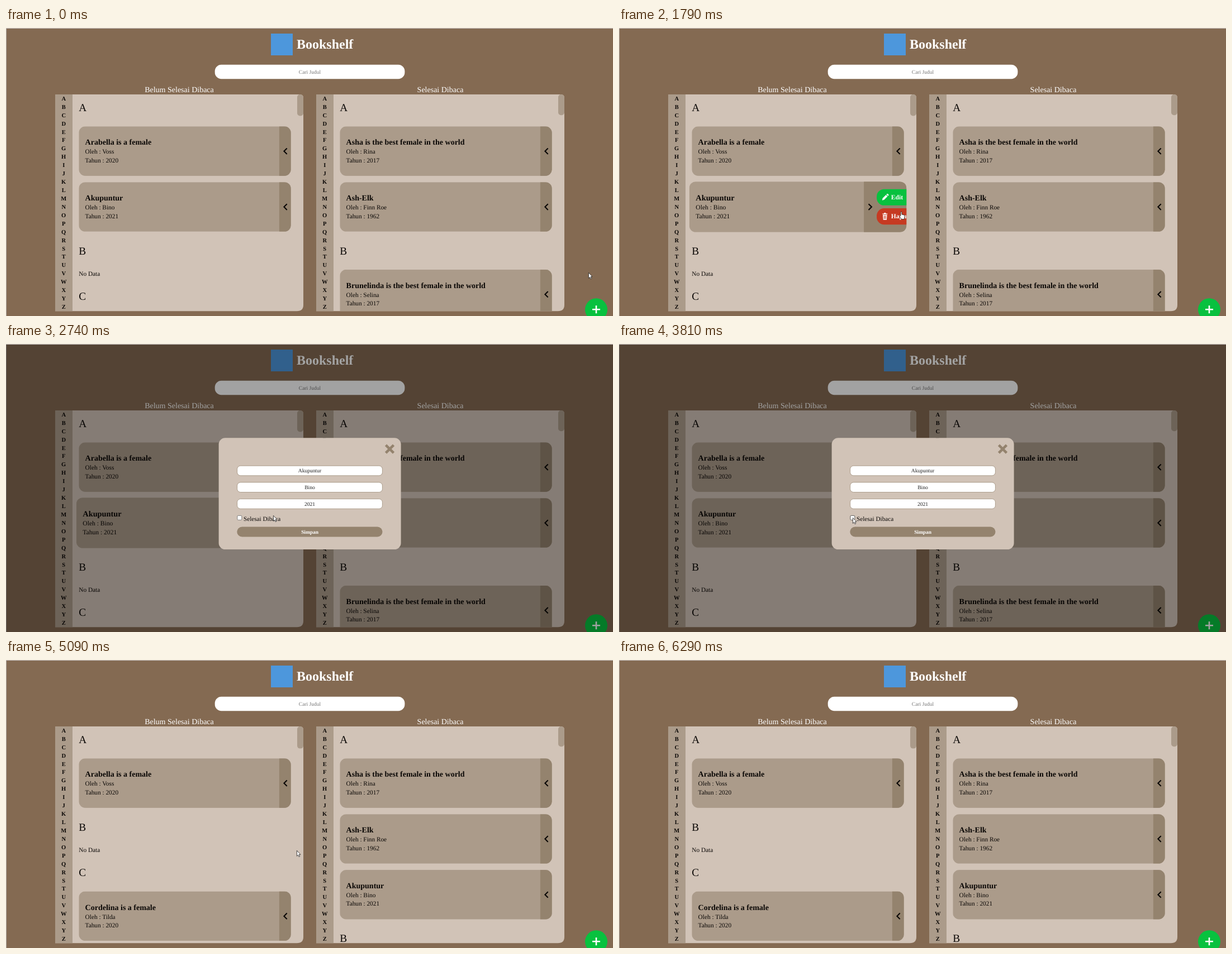
Recreate the animation shown at these times as an HTML page. Size 1086 by 516 pixels, loop 6.84 s.

```html
<!DOCTYPE html>
<html lang="id">
<head>
<meta charset="utf-8">
<title>Bookshelf</title>
<style>
html, body { margin: 0; width: 100%; height: 100%; overflow: hidden; background: #846a52; }
svg { display: block; width: 1086px; height: 516px; font-family: "Liberation Serif", "Times New Roman", serif; text-rendering: geometricPrecision; }
.hide { display: none; }
</style>
</head>
<body>
<svg id="stage" viewBox="0 0 1086 516" xmlns="http://www.w3.org/2000/svg"></svg>
<script>
const LOOP = 6840;
const PANEL = '#d1c3b7', CARD = '#ab9b8a', DARK = '#94836e', GREEN = '#08c13f', INK = '#0b0806';
const CARD_W = 379.4, CARD_H = 88.6, SLOT = 99.9, CLOSED = 20.8, OPEN = 91.8;

const text = (x, y, size, str, opts = '') =>
  `<text x="${x}" y="${y}" font-size="${size}" ${opts}>${str}</text>`;
const rect = (x, y, w, h, r, fill, opts = '') =>
  `<rect x="${x}" y="${y}" width="${w}" height="${h}" rx="${r}" fill="${fill}" ${opts}/>`;
const MID = 'text-anchor="middle"', BOLD = 'font-weight="700"', WHITE = 'fill="#fff"';

const books = {
  arabella: ['Arabella is a female', 'Voss', 2020],
  akupuntur: ['Akupuntur', 'Bino', 2021],
  cordelina: ['Cordelina is a female', 'Tilda', 2020],
  asha: ['Asha is the best female in the world', 'Rina', 2017],
  ashElk: ['Ash-Elk', 'Finn Roe', 1962],
  brunelinda: ['Brunelinda is the best female in the world', 'Selina', 2017]
};

const pencil = `<g transform="translate(9.5 7.6)" fill="#fff">
  <path d="M0 12L.8 8.4 6.7 2.5 9.4 5.2 3.5 11.1Z"/><path d="M7.4 1.8L8.6.6H9.8L11.3 2.1V3.3L10.1 4.5Z"/></g>`;
const trash = `<g transform="translate(10 7.8)">
  <path d="M0 1.3H2.6L3.2 0H5.6L6.2 1.3H8.8V2.7H0ZM.7 3.5H8.1L7.4 12.4H1.4Z" fill="#fff"/>
  <path d="M2.9 5V10.8M4.4 5V10.8M5.9 5V10.8" stroke="#c63a22" stroke-width=".8"/></g>`;

const button = (id, y, icon, label) =>
  `<g transform="translate(22.4 ${y})"><rect id="${id}" width="63.6" height="28.5" rx="13"/>${icon}` +
  text(25.2, 17.5, 11.3, label, `${BOLD} ${WHITE}`) + '</g>';

function card(key, y, id = '') {
  const [title, author, year] = books[key];
  const name = part => id ? `id="${id}${part}"` : '';
  const actions = id === 'edit'
    ? button('editBtn', 13.2, pencil, 'Edit') + button('delBtn', 46.8, trash, 'Hapus') : '';
  return `<g transform="translate(130.3 ${y})"><g ${name('Card')}><g clip-path="url(#cardClip)">` +
    rect(0, 0, CARD_W, CARD_H, 0, CARD) +
    text(11.3, 33.2, 14, title, BOLD) +
    text(11.3, 49, 11.3, 'Oleh : ' + author) +
    text(11.3, 64.4, 11.3, 'Tahun : ' + year) +
    `<g ${name('Toggle')} transform="translate(${CARD_W - CLOSED} 0)">` +
    rect(0, 0, 110, CARD_H, 0, DARK) +
    `<path ${name('Chevron')} transform="translate(11 44.4)" d="M2.8-5.3L-2.5 0 2.8 5.3" fill="none" stroke="${INK}" stroke-width="2.1"/>` +
    actions + '</g></g></g></g>';
}

// Each section: letter followed by its cards, or a "No Data" line.
function panel(dx, thumb, sections) {
  let out = '', base = 149;
  for (const [letter, ...items] of sections) {
    out += text(130.3, base, 19.3, letter);
    if (!items.length) {
      out += text(130.3, base + 38, 11.3, 'No Data');
      base += 81.6;
      continue;
    }
    items.forEach(([key, id], i) => out += card(key, base + 27.3 + i * SLOT, id));
    base += 27.3 + items.length * SLOT + 29.4;
  }
  const letters = [...'ABCDEFGHIJKLMNOPQRSTUVWXYZ'].map((c, i) =>
    text(103.2, 129.8 + i * 14.93, 10.5, c, `${BOLD} ${MID}`)).join('');
  return `<g transform="translate(${dx} 0)" fill="${INK}"><g clip-path="url(#panelClip)">` +
    rect(88, 119, 444, 389, 0, PANEL) + rect(88, 119, 31, 389, 0, CARD) +
    letters + out + rect(521, 119, 11, thumb, 5, CARD) + '</g></g>';
}

const field = (value, i) =>
  rect(413.6, 218.2 + i * 29.7, 259.8, 17.6, 6, '#fff', `stroke="${DARK}" stroke-width=".7"`) +
  text(543.5, 230.2 + i * 29.7, 9.6, value, `${MID} fill="#222"`);

document.getElementById('stage').innerHTML = `
<defs>
  <clipPath id="cardClip"><rect width="${CARD_W}" height="${CARD_H}" rx="11.5"/></clipPath>
  <clipPath id="panelClip"><path d="M88 119H526Q532 119 532 125V496Q532 507.3 520.5 507.3H88Z"/></clipPath>
</defs>` +
rect(0, 0, 1086, 516, 0, '#846a52') +
rect(0, 0, 1, 516, 0, '#b3aca8') +
rect(474, 10, 39, 39, 0, '#4d97dc') +
text(520, 37, 24, 'Bookshelf', `${BOLD} ${WHITE}`) +
rect(373.7, 65.8, 339.7, 25.4, 11.5, '#fff') +
text(543.5, 81.6, 9.5, 'Cari Judul', `${MID} fill="#757575"`) +
text(310, 115.4, 14, 'Belum Selesai Dibaca', `${MID} ${WHITE}`) +
text(777, 115.4, 14, 'Selesai Dibaca', `${MID} ${WHITE}`) +
`<g id="before">` +
panel(0, 38.4, [['A', ['arabella'], ['akupuntur', 'edit']], ['B'], ['C']]) +
panel(467, 37.2, [['A', ['asha'], ['ashElk']], ['B', ['brunelinda']]]) +
`</g><g id="after">` +
panel(0, 39.6, [['A', ['arabella']], ['B'], ['C', ['cordelina']]]) +
panel(467, 36.2, [['A', ['asha'], ['ashElk'], ['akupuntur', 'moved']], ['B']]) +
`</g>
<circle cx="1056" cy="504.3" r="20" fill="${GREEN}"/>
<path d="M1049 504.3H1063M1056 497.3V511.3" stroke="#fff" stroke-width="2.6"/>
<g id="modal">` +
rect(0, 0, 1086, 516, 0, '#000', 'opacity=".365"') +
rect(380.6, 168.3, 326, 199.8, 11.5, PANEL) +
`<path d="M679.5 181.2L693.5 195.2M693.5 181.2L679.5 195.2" stroke="${DARK}" stroke-width="4.6"/>` +
books.akupuntur.map(field).join('') +
`<rect id="box" x="413.9" y="307.4" width="7.9" height="7.9" rx="1.6" stroke-width=".9"/>
<path id="tick" d="M415.6 311.5L417.2 313.1 420.2 309.4" fill="none" stroke="#fff" stroke-width="1.3"/>` +
text(425, 316.5, 11.2, 'Selesai Dibaca', `fill="${INK}"`) +
`<rect id="save" x="413.3" y="327.5" width="260.2" height="18" rx="9"/>` +
text(543.5, 339.6, 9.4, 'Simpan', `${BOLD} ${MID} ${WHITE}`) +
`</g>` + rect(0, 0, 1086, 1, 0, '#cbc6c4') +
`<g id="cursor" fill="#fff" stroke="#222" stroke-width=".8" stroke-linejoin="round">
  <path id="arrow" d="M.4.4V10.4L2.6 8.3 4.1 11.6 5.7 10.9 4.2 7.6H7Z"/>
  <path id="hand" d="M-1 7.6V1.2Q-1 .2 0 .2T1 1.2V5L5 6Q6.6 6.5 6.4 8L5.2 13.6H.4L-2.7 9Q-3.2 8 -2.2 7.5Z"/>
</g>`;

const el = id => document.getElementById(id);
const set = (id, name, value) => el(id).setAttribute(name, value);
const show = (id, on) => el(id).classList.toggle('hide', !on);
const within = (t, from, to) => t >= from && t < to;

// Eased 0..1 over a span of time
function ramp(t, from, span) {
  const u = Math.min(1, Math.max(0, (t - from) / span));
  return u * u * (3 - 2 * u);
}

// Turning points of the pointer: start of move, duration, x, y
const moves = [
  [160, 260, 1019, 452], [420, 430, 688, 369], [850, 150, 590, 250], [1000, 250, 505, 329],
  [1930, 420, 478, 307], [2900, 410, 515, 312], [3310, 500, 418, 311],
  [3950, 610, 520, 341], [5400, 220, 567, 362], [5620, 550, 788, 490]
];

function pointer(t) {
  let x = 1042, y = 438;
  for (const [from, span, toX, toY] of moves) {
    const u = Math.min(1, Math.max(0, (t - from) / span));
    x += (toX - x) * u;
    y += (toY - y) * u;
  }
  return [x, y];
}

function hover(id, t, enter, leave) {
  const s = 1 + .024 * (ramp(t, enter, 300) - ramp(t, leave, 300));
  const cx = CARD_W / 2, cy = CARD_H / 2;
  set(id + 'Card', 'transform', `translate(${cx} ${cy}) scale(${s}) translate(${-cx} ${-cy})`);
}

function draw(t) {
  const [x, y] = pointer(t);
  const saved = t >= 5090, editing = within(t, 2740, 5090), checked = t >= 3950;
  const onBox = within(t, 3560, 4080), onSave = within(t, 4200, 5090);
  show('before', !saved);
  show('after', saved);
  show('modal', editing);
  hover('edit', t, 1250, 2740);
  hover('moved', t, 5620, 5980);

  const opened = t < 2740 ? ramp(t, 1500, 430) : 0;
  set('editToggle', 'transform', `translate(${CARD_W - CLOSED - (OPEN - CLOSED) * opened} 0)`);
  set('editChevron', 'transform', `translate(11 44.4) scale(${opened > .4 ? -1 : 1} 1)`);
  set('editBtn', 'fill', t >= 2350 ? '#058f2c' : GREEN);
  set('delBtn', 'fill', within(t, 2080, 2200) ? '#a32a16' : '#c63a22');

  set('box', 'fill', checked ? '#0b75f5' : '#fff');
  set('box', 'stroke', checked ? '#0b75f5' : onBox ? '#4f4f4f' : '#767676');
  show('tick', checked);
  set('save', 'fill', onSave ? CARD : DARK);

  const hand = within(t, 1250, 2740) || onSave;
  show('cursor', t < 6290);
  show('arrow', !hand);
  show('hand', hand);
  set('cursor', 'transform', `translate(${x} ${y})`);
}

const start = performance.now();
function tick() {
  draw((performance.now() - start) % LOOP);
  requestAnimationFrame(tick);
}
tick();
</script>
</body>
</html>
```
